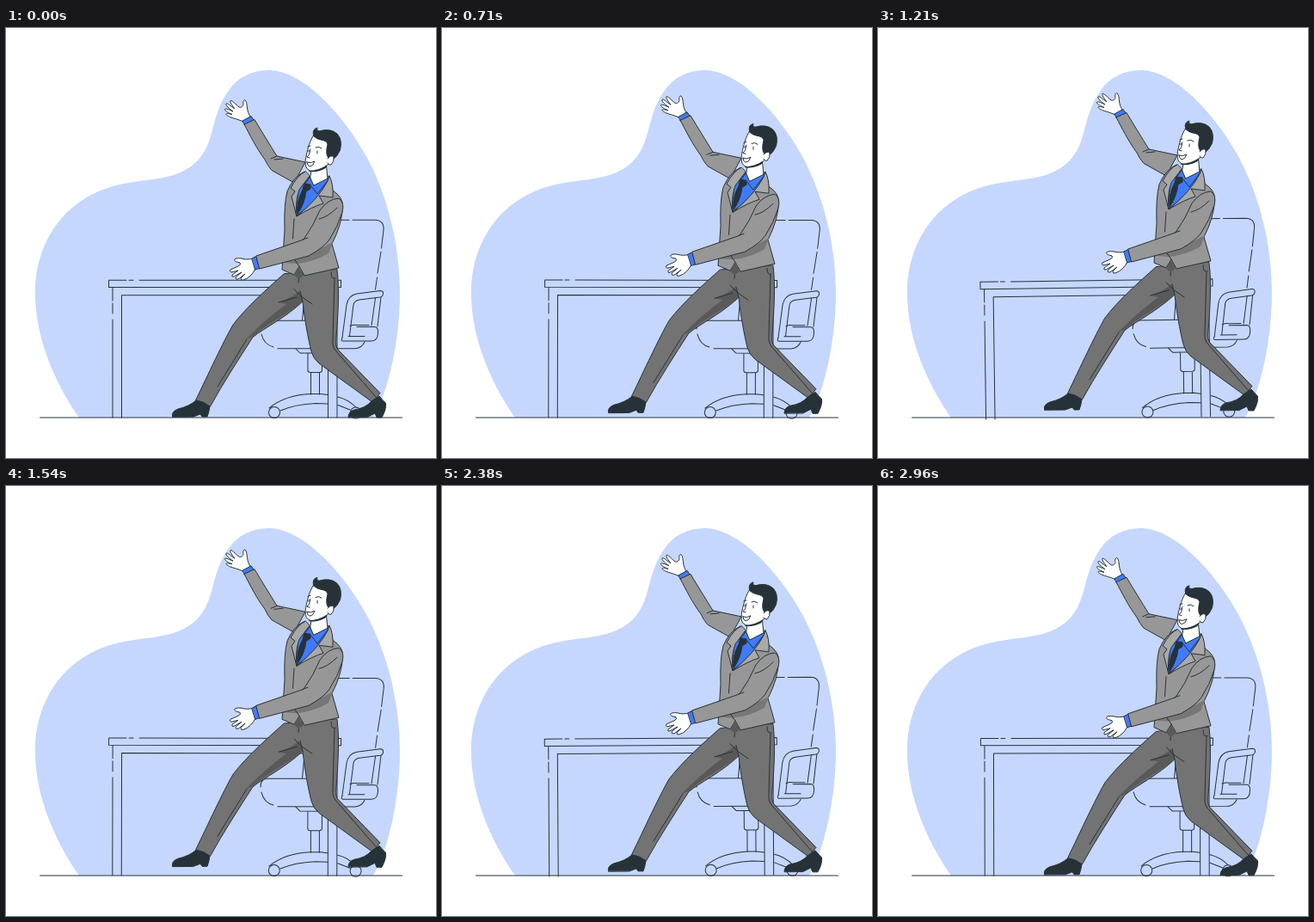
An HTML page that plays this animation: 500 px wide and 500 px high, repeating every 3000 ms.

```html
<!DOCTYPE html>
<html lang="en">
<head>
<meta charset="utf-8">
<title>Welcoming man at a desk</title>
<style>
html, body { margin: 0; width: 100%; height: 100%; overflow: hidden; background: #fff; }
svg { display: block; width: 100vw; height: 100vh; }
.line, .man path { stroke: #263238; stroke-width: 1; stroke-linecap: round; stroke-linejoin: round; }
.line, .man .ink { fill: none; }
.skin { fill: #fff; }
.blue { fill: #407bff; }
.dark { fill: #263238; }
.coat { fill: #979797; }
.lapel { fill: #a9a9a9; }
.pants { fill: #737373; }
.man .shade { fill: #777; stroke: none; }
.man .deep { fill: #595959; stroke: none; }
</style>
</head>
<body>
<svg viewBox="0 0 500 500">
  <path fill="#c5d7ff" d="M85 453C66 426 33 369 34 306C35 243 73 196 130 182.500C168 174 198 178 221.500 155.500C244 133 237 104 258 74C269 57 286 49 306 49C348 50 395 105 420 151C449 206 458 265 458 308C458 360 446 420 427 453Z"/>
  <path class="line" d="M39.500 453H460.500"/>

  <g id="office" class="line">
    <!-- chair -->
    <path d="M386 223.200H399M403 223.200H429Q440 223.500 439 235L436.500 256M436 260L432 285M431.500 290L429.500 304"/>
    <path d="M391 360L396 322Q398 311 408 309L435 305.500Q439 305.500 438.500 309T435 313L411 316Q405 317 404 322L399.500 358"/>
    <path d="M436 313L432 347M429.500 314L425 346M400 346.500Q404 344.500 408 345.500H422M408 347.500H429Q433 348 432.500 355Q432 364 425 364H392Q389 364 391 360M398 358.500H417"/>
    <path d="M346.500 318L344.500 340M350 340.200H303Q296 341 296 350M297 356Q300 368 311 371M316 372.700H406Q414 372 417 365"/>
    <path d="M337 373L342 378H366L370 373M351 378V398Q351 400.500 354 400.500H365Q367.500 400 367.500 398V378M354.500 400.500V426M364.500 400.500V426"/>
    <path d="M306 442Q324 427 354 425.500H366L374 426.500M386 429Q398 432 407 441M319 445Q336 437.500 360 436.500L374 437M386 438.500L400 444"/>
    <circle cx="312" cy="447" r="6.500"/>
    <circle cx="406.800" cy="447.500" r="6.500"/>
    <!-- desk -->
    <path d="M140 293.200H119.500V301.500H389.500V293.200H155M143 293.200H148"/>
    <path d="M124 302V317M124 320V332M124 339V453M134.500 453V310.700H374.500V453M385 302V453"/>
  </g>

  <g id="man" class="man">
    <!-- trousers -->
    <path class="pants" d="M323 286C303 304 280 324 264 345C252 366 235 403 220.500 433L237.500 440C253 412 270 386 287 359.500C300 349 325 337 345 318C347 337 351 360 355 376Q357 384 364 390L426 435L435 424.500L386 374Q383 371 384 360C386 335 388 305 385 281Z"/>
    <path class="deep" d="M317 319Q332 314 341 306L345 318C330 331 304 343 287 359L279 362Q300 340 326 321Z"/>
    <path class="ink" d="M378 284Q378 293 383 291M382 292L380 362Q379 371 384 376L430 429M356 321Q344 314 335 304M345 318L342 306M317 319L338 313M341 287L340 296M280 362L246 417"/>
    <path class="dark" d="M193.500 452Q192 446 200 443Q213 440 221 433Q230 434 237 440Q236 447 234 452H228L226 449L218 452Z"/>
    <path class="dark" d="M398 452.500Q398 446 405 444Q418 442 425 434L434 428Q438 433 441.500 436Q442.500 443 437 453H431L429 448L420 452.500Z"/>

    <!-- raised arm -->
    <path class="skin" d="M276 109C272 107 268 106 265 105C261 104 257 102 256 100.500C256 99 258 99.500 263 100.500C259 99 254.500 96.500 254.500 94.500C255 93 257 94 264 97C260 94 255 90 256 88C257.500 87 260 90 266 94C263 90 260 86 261 84.500C263 84 266 88 271 92C273 93 275.500 91.500 276 89C275.500 86 276 83.500 278 83.800C280 86 280 89 280.500 93C281 97 282 100 284 103Z"/>
    <path class="blue" d="M275 108L285 102.500L288 107L278 112.500Z"/>
    <path class="coat" d="M277 112L289 106.500C297 120 307 136 315 149L348 156L335 180L309 165.500Q304 160 301 153C290 138 284 125 277 112Z"/>
    <path class="ink" d="M315 149L308 152M312 153L322 152"/>

    <!-- neck, shirt, tie -->
    <path class="skin" d="M356 160L353 178L358 184L374 176L372 155Z"/>
    <path class="blue" d="M353 173Q346 177 340 188L336 219L372 195L376 174L358 183Z"/>
    <path class="ink" d="M353 174L346 183L350 183M376 175L362 193L355 184"/>
    <path class="dark" d="M347 181L354 182L354 187L349 190Q347 205 339 216Q337 203 345 188Z"/>

    <!-- jacket -->
    <path class="coat" d="M347 167Q334 173 327 190Q323 205 324 235L321 281L335 287L341 277L347 288L387 279L379 251Q391 228 391.500 207Q392 197 380 189L375 172C376 188 358 204 338 219Q333 203 340 187Z"/>
    <path class="shade" d="M324 273L352 264L380 249L375 262Q358 272 338 274Z"/>
    <path class="deep" d="M335 287L341 277L346 288L340 292Z"/>
    <path class="lapel" d="M348 167Q339 171 331 186L336 190L332 196L338 219Q336 202 341 188L353 172Z"/>
    <path class="lapel" d="M376 172Q381 181 380 197L364 195L369 204Q356 208 338 219Q363 199 374 178Z"/>
    <path class="ink" d="M335 222L333.500 245M341 277L336 270"/>

    <!-- lower arm -->
    <path class="skin" d="M288 268Q280 270 274 268Q266 267 265.500 270Q266 272 272 273Q274 275 270 277L261 281Q259 283 262 284L270 282L263 287Q262 290 265 289L274 284L267 290Q267 293 270 292L278 286L273 291Q273 294 276 293Q285 290 290 280Z"/>
    <path class="blue" d="M286 268L292 265L296 279L290 281Z"/>
    <path class="coat" d="M291 265L346 246Q358 229 365 212Q374 199 387 198Q394 203 391 214Q386 231 376 246Q370 255 352 265L295 280Z"/>
    <path class="ink" d="M345 246L351 244M364 222Q374 220 385 209"/>

    <!-- head -->
    <path class="skin" d="M358 124C353 132 351 140 349.500 147Q347 156 349 162Q352 167 358 166.500Q370 164 376 157L384 145L380 126Z"/>
    <path class="dark" d="M353 166.500Q361 168 371 163L373 160Q364 166 353 166.500Z"/>
    <path class="dark" d="M358 126Q355 118 362 116Q360 118.500 364 120Q377 116 385 123Q391.500 130 388.500 142Q385 150 380 153L375 151Q371 147 374 135Q373 131 366 130Q361 129 358 126Z"/>
    <path class="skin" d="M374 152Q378 147 381 150Q382 155 378 159Q375 160 374 157"/>
    <path class="ink" d="M354 141L352.500 147L350 150L353 151M362 143V146M352 142V144M360 139Q364 137 367 140M351 138L354 137"/>
    <path class="skin" d="M350 156Q354 158 359 155Q357 161 353 161Q350 160 350 156Z"/>
  </g>
</svg>
<script>
const office = document.getElementById('office');
const man = document.getElementById('man');

// Triangle wave: 0 at the start, 1 halfway, 0 at the end of each period.
const tri = p => 1 - Math.abs(2 * (p - Math.floor(p)) - 1);

function draw(now) {
  const sway = 2 * tri(now / 1500 + .25) - 1;
  const lift = 10 * tri(now / 3000);
  office.setAttribute('transform', `rotate(${sway} 279.5 338.5)`);
  man.setAttribute('transform', `translate(0 ${-lift})`);
  requestAnimationFrame(draw);
}
draw(0);
</script>
</body>
</html>
```
